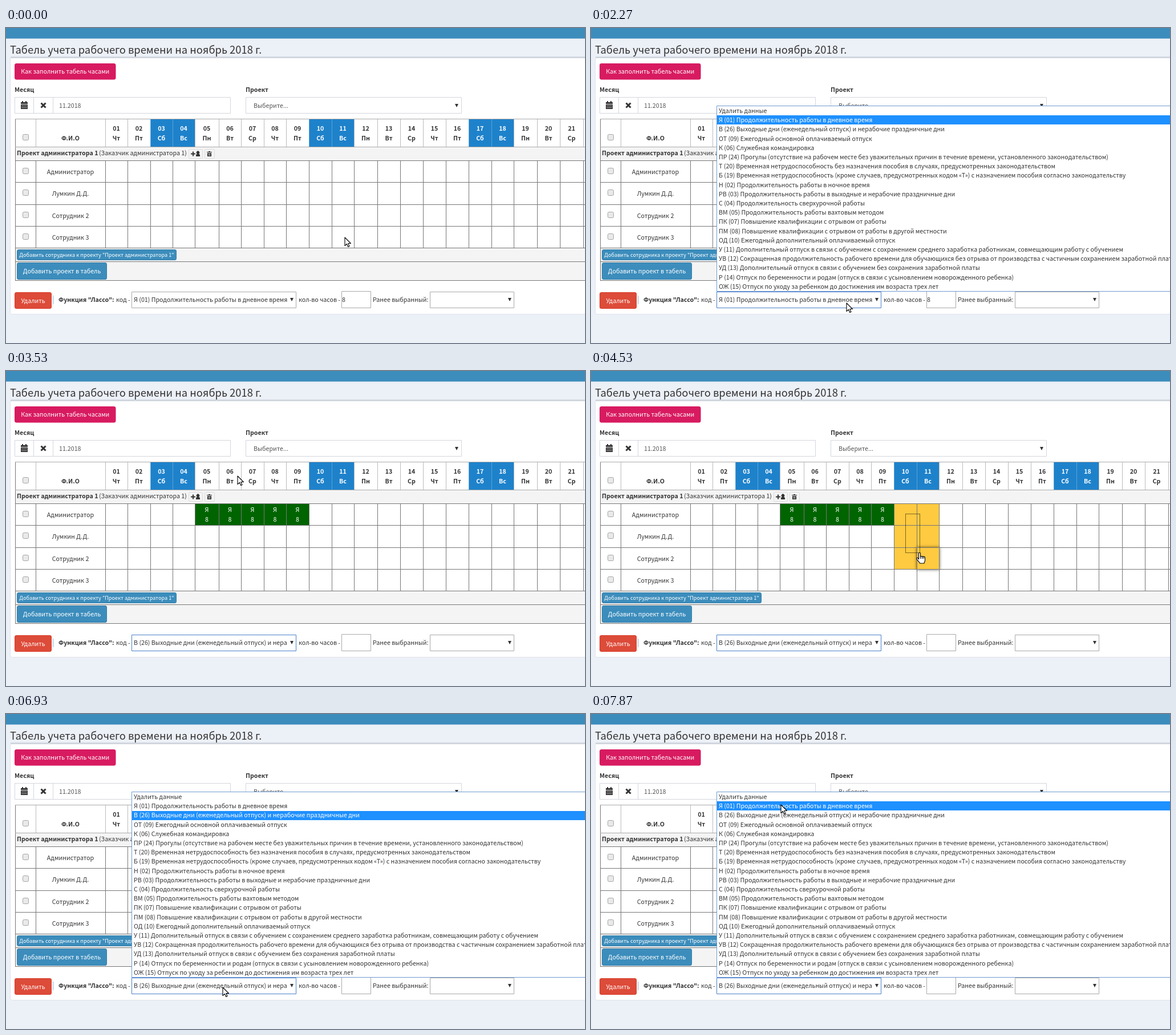
An HTML page with a canvas for the animation above (8 s loop, 1015x552 px).

```html
<!DOCTYPE html>
<html lang="ru">
<head>
<meta charset="utf-8">
<style>
html, body { margin: 0; width: 100%; height: 100%; overflow: hidden; background: #ecf0f7; }
canvas { display: block; }
</style>
</head>
<body>
<canvas id="stage" width="1015" height="552"></canvas>
<script>
const ctx = document.getElementById('stage').getContext('2d');
const LOOP = 8000;
const INK = '#333', GRID = '#777', BLUE = '#3c8dbc', FIELD = '#d2d6de';

// Prefer the CJK face only if its Cyrillic is proportional.
const CJK = '"Noto Sans CJK JP", "Noto Sans CJK SC", "Noto Sans", sans-serif';
ctx.font = '10px ' + CJK;
const FAMILY = ctx.measureText('жизнь').width < 38 ? CJK : '"Noto Sans", "Open Sans", sans-serif';
const font = (size, weight = 400) => `${weight} ${size}px ${FAMILY}`;
const REGULAR = font(10.68), BOLD = font(10.68, 700), SMALL = font(9.2), TITLE = font(18.36);

const columns = [174, 213, 253, 292, 331, 373, 412, 452, 491, 531, 571, 610,
  651, 691, 731, 771, 811, 851, 890, 931, 971, 1012, 1052];
const rows = [232, 270, 309, 347, 385];
const weekdays = ['Чт', 'Пт', 'Сб', 'Вс', 'Пн', 'Вт', 'Ср'];
const people = ['Администратор', 'Лумкин Д.Д.', 'Сотрудник 2', 'Сотрудник 3'];
const codes = [
  'Удалить данные',
  'Я (01) Продолжительность работы в дневное время',
  'В (26) Выходные дни (еженедельный отпуск) и нерабочие праздничные дни',
  'ОТ (09) Ежегодный основной оплачиваемый отпуск',
  'К (06) Служебная командировка',
  'ПР (24) Прогулы (отсутствие на рабочем месте без уважительных причин в течение времени, установленного законодательством)',
  'Т (20) Временная нетрудоспособность без назначения пособия в случаях, предусмотренных законодательством',
  'Б (19) Временная нетрудоспособность (кроме случаев, предусмотренных кодом «Т») с назначением пособия согласно законодательству',
  'Н (02) Продолжительность работы в ночное время',
  'РВ (03) Продолжительность работы в выходные и нерабочие праздничные дни',
  'С (04) Продолжительность сверхурочной работы',
  'ВМ (05) Продолжительность работы вахтовым методом',
  'ПК (07) Повышение квалификации с отрывом от работы',
  'ПМ (08) Повышение квалификации с отрывом от работы в другой местности',
  'ОД (10) Ежегодный дополнительный оплачиваемый отпуск',
  'У (11) Дополнительный отпуск в связи с обучением с сохранением среднего заработка работникам, совмещающим работу с обучением',
  'УВ (12) Сокращенная продолжительность рабочего времени для обучающихся без отрыва от производства с частичным сохранением заработной платы',
  'УД (13) Дополнительный отпуск в связи с обучением без сохранения заработной платы',
  'Р (14) Отпуск по беременности и родам (отпуск в связи с усыновлением новорожденного ребенка)',
  'ОЖ (15) Отпуск по уходу за ребенком до достижения им возраста трех лет'
];
const MENU_TOP = 137.2, MENU_ROW = 16.2;

// Pointer stops: time, x, y
const route = [
  [70, 594, 367], [530, 365, 254], [670, 365, 254], [1070, 503, 254], [1200, 507, 254],
  [1470, 507, 254], [2000, 448, 482], [2530, 448, 482], [3200, 406, 184], [3530, 406, 184],
  [3730, 548, 224], [3870, 548, 226], [4000, 551, 250], [4200, 551, 250], [4800, 595, 368],
  [6330, 595, 368], [6730, 380, 479], [7130, 380, 479], [7530, 337, 147], [7670, 337, 147],
  [7870, 333, 159]
];
const lassos = [
  { start: 670, release: 1270, filled: 1470, x: 365, y: 254, marks: ['Я', '8'], fill: '#006400', ink: '#fff' },
  { start: 4200, release: 5270, filled: 5600, x: 551, y: 250, marks: ['В'], fill: '#ff0', ink: '#2b7d2b' }
];

const ARROW = new Path2D('M0 0V14.6L3.4 11.4 5.7 16.4 8 15.4 5.8 10.5H10.4Z');
const HAND = new Path2D('M-1.5 12V1.8a1.5 1.5 0 0 1 3 0V8c0-2 3-1.7 3 0c0-1.6 2.6-1.4 2.6.3' +
  'c0-1.5 2.4-1.2 2.4.6V14c0 2-1.5 3-1.5 5H.5C-.5 16.5-4 13.5-5 11.2c-.8-2 1.5-2.4 2.3-1.2Z');
const KNUCKLES = new Path2D('M1.5 8v3M4.5 8v3M7.1 8.5v2.5');

function rect(x, y, w, h, color) {
  ctx.fillStyle = color;
  ctx.fillRect(x, y, w, h);
}
function box(x, y, w, h, fill, border, radius = 0) {
  ctx.beginPath();
  ctx.roundRect(x + .5, y + .5, w - 1, h - 1, radius);
  ctx.fillStyle = fill;
  ctx.fill();
  ctx.strokeStyle = border;
  ctx.lineWidth = 1;
  ctx.stroke();
}
function text(s, x, y, { color = INK, align = 'left', face = REGULAR } = {}) {
  ctx.font = face;
  ctx.fillStyle = color;
  ctx.textAlign = align;
  ctx.fillText(s, x, Math.round(y));
}
function shape(d, color) {
  ctx.fillStyle = color;
  ctx.fill(new Path2D(d));
}
function button(label, x, y, w, h, fill, border, face = REGULAR) {
  box(x, y, w, h, fill, border, 2.5);
  text(label, x + w / 2, y + h / 2 + (face === SMALL ? 3.5 : 4), { color: '#fff', align: 'center', face });
}
const checkbox = y => box(29, y, 11, 11, '#e9e9e9', '#a5a5a5', 2);
const caret = (x, y) => shape(`M${x} ${y}h6l-3 6z`, INK);

function pointer(t) {
  const i = route.findIndex(stop => stop[0] > t);
  if (i === 0) return route[0].slice(1);
  if (i < 0) return route.at(-1).slice(1);
  const [t0, x0, y0] = route[i - 1], [t1, x1, y1] = route[i];
  const k = (t - t0) / (t1 - t0), e = k * k * (3 - 2 * k);
  return [x0 + (x1 - x0) * e, y0 + (y1 - y0) * e];
}

function drawPage() {
  rect(0, 0, 1015, 552, '#ecf0f7');
  rect(0, 0, 1015, 18.5, BLUE);
  text('Табель учета рабочего времени на ноябрь 2018 г.', 7, 45, { face: TITLE });
  box(7, 50, 1020, 452, '#fff', '#dfe2ea', 3);
  rect(8, 50, 1007, 3, FIELD);
  button('Как заполнить табель часами', 15, 62, 177.5, 28.5, '#d81b60', '#d81b60');

  text('Месяц', 15, 112, { face: BOLD });
  text('Проект', 420, 112, { face: BOLD });
  box(15, 121, 379, 29, '#fff', FIELD);
  rect(48, 121, 1, 29, FIELD);
  rect(82, 121, 1, 29, FIELD);
  text('11.2018', 93, 140, { color: '#555' });
  shape('M26 130h2v-2h2v2h4v-2h2v2h2v3h-12zM26 134h12v8h-12z', INK);
  for (const y of [136, 139]) rect(27, y, 10, 1, '#aaa');
  ctx.strokeStyle = INK;
  ctx.lineWidth = 3;
  ctx.stroke(new Path2D('M61.5 131.5l8 8m0-8l-8 8'));
  box(420, 121, 379, 29, '#fff', FIELD);
  text('Выберите...', 434, 140, { color: '#555' });
  caret(787, 133);
}

function drawTable() {
  rect(16, 208, 999, 24, '#f4f4f4');
  rect(16, 385, 999, 57, '#f4f4f4');
  columns.forEach((x, i) => {
    const weekend = i % 7 === 2 || i % 7 === 3;
    const style = { align: 'center', face: BOLD, color: weekend ? '#fff' : INK };
    const mid = (x + columns[i + 1]) / 2;
    if (weekend) rect(x, 160, columns[i + 1] - x, 48, '#1e82cb');
    rect(x, 160, 1, 48, weekend ? '#5aa3d8' : '#bbb');
    rect(x, 232, 1, 154, GRID);
    text(String(i + 1).padStart(2, '0'), mid, 180, style);
    text(weekdays[i % 7], mid, 197, style);
  });
  rect(52, 160, 1, 48, '#bbb');
  rect(52, 232, 1, 154, GRID);
  rect(16, 159, 1, 284, GRID);
  for (const y of [159, 208]) rect(16, y, 999, 1, '#aaa');
  for (const y of [...rows, 409, 442]) rect(16, y, 999, 1, GRID);

  checkbox(186);
  text('Ф.И.О', 113, 197, { align: 'center', face: BOLD });
  people.forEach((name, i) => {
    checkbox(rows[i] + 13);
    text(name, 113, rows[i] + 24, { align: 'center' });
  });

  text('Проект администратора 1', 19, 223, { face: BOLD });
  text('(Заказчик администратора 1)', 163, 223);
  box(320, 212, 25, 17, '#f4f4f4', '#ddd', 2);
  box(348, 212, 18, 17, '#f4f4f4', '#ddd', 2);
  shape('M324 219.5h3v-3h2v3h3v2h-3v3h-2v-3h-3zM333 225v-2q0-2 2-2.5a2.7 2.7 0 1 1 3 0q2 .5 2 2.5v2z', INK);
  shape('M352 217h3v-1h3v1h3v1h-9zM353 219h7v6h-7z', INK);
  rect(355, 220, 1, 4, '#ccc');
  rect(357, 220, 1, 4, '#ccc');

  button('Добавить сотрудника к проекту "Проект администратора 1"', 19, 388, 280, 19, BLUE, '#367fa9', SMALL);
  button('Добавить проект в табель', 19, 411, 158, 30, BLUE, '#367fa9');
}

function drawTools(t, value) {
  button('Удалить', 15, 463, 65, 29, '#dd4b39', '#d73925');
  rect(82, 469, 1, 15, '#8ab4cf');
  text('Функция "Лассо":', 92, 480, { face: BOLD });
  text('код -', 193, 480);
  box(220, 462, 289, 29, '#fff', t >= 2000 ? '#4a7fc9' : '#a9a9a9');
  ctx.save();
  ctx.beginPath();
  ctx.rect(222, 463, 271, 27);
  ctx.clip();
  text(codes[value], 224, 480);
  ctx.restore();
  caret(498, 473);
  text('кол-во часов -', 513, 480);
  box(588, 461, 52, 30, '#fff', '#a9a9a9');
  if (value === 1) text('8', 589, 480);
  text('Ранее выбранный:', 643, 480);
  box(743, 462, 148, 29, '#fff', '#a9a9a9');
  caret(880, 473);
}

function drawCells(t, hover) {
  const painted = new Map();
  const cell = (r, c, style) => {
    const x = columns[c], y = rows[r], w = columns[c + 1] - x, h = rows[r + 1] - y;
    box(x, y, w + 1, h + 1, style?.fill ?? '#fff', GRID);
    style?.marks?.forEach((mark, i) =>
      text(mark, x + w / 2, y + 15 + 17 * i, { color: style.ink, align: 'center' }));
  };
  for (const lasso of lassos) {
    if (t < lasso.start) continue;
    const [x, y] = pointer(Math.min(t, lasso.release));
    const style = t >= lasso.filled ? lasso : { fill: t >= lasso.release ? '#f39814' : '#feca40' };
    for (let r = 0; r < 4; r++) {
      for (let c = 0; c < 22; c++) {
        if (columns[c] > x || columns[c + 1] < lasso.x || rows[r] > y || rows[r + 1] < lasso.y) continue;
        painted.set(r * 22 + c, style);
        cell(r, c, style);
      }
    }
  }
  if (!hover) return;
  const c = columns.findLastIndex(x => x <= hover[0]);
  const r = rows.findLastIndex(y => y <= hover[1]);
  ctx.save();
  ctx.shadowColor = 'rgba(0,0,0,.65)';
  ctx.shadowBlur = 5;
  rect(columns[c], rows[r], columns[c + 1] - columns[c] + 1, rows[r + 1] - rows[r] + 1, '#fff');
  ctx.restore();
  cell(r, c, painted.get(r * 22 + c));
}

function drawLasso(t, [x, y]) {
  const lasso = lassos.find(l => t >= l.start && t < l.release);
  if (!lasso) return;
  ctx.strokeStyle = '#000';
  ctx.lineWidth = 1;
  ctx.setLineDash([1, 1]);
  ctx.strokeRect(lasso.x + .5, lasso.y + .5, Math.round(x - lasso.x), Math.round(y - lasso.y));
  ctx.setLineDash([]);
}

function drawMenu(value, y) {
  const active = y < MENU_TOP + MENU_ROW * codes.length ? Math.floor((y - MENU_TOP) / MENU_ROW) : value;
  box(220, 136, 810, 326, '#fff', '#6f9bd1');
  rect(221, Math.round(MENU_TOP + active * MENU_ROW), 794, 16, '#1e90ff');
  codes.forEach((code, i) =>
    text(code, 224, 149 + i * MENU_ROW, { color: i === active ? '#fff' : INK }));
}

function drawPointer([x, y], hand) {
  ctx.save();
  ctx.translate(Math.round(x), Math.round(y));
  ctx.lineJoin = 'round';
  ctx.lineWidth = 1.1;
  ctx.strokeStyle = '#000';
  ctx.fillStyle = '#fff';
  ctx.fill(hand ? HAND : ARROW);
  ctx.stroke(hand ? HAND : ARROW);
  if (hand) ctx.stroke(KNUCKLES);
  ctx.restore();
}

function draw() {
  const t = performance.now() % LOOP;
  const at = pointer(t);
  const value = t < 3530 ? 1 : 2;
  const open = (t >= 2200 && t < 3530) || t >= 6870;
  const overCells = t >= 70 && !open && at[0] > columns[0] && at[1] >= rows[0] && at[1] < rows[4];
  drawPage();
  drawTable();
  drawTools(t, value);
  drawCells(t, overCells && at);
  drawLasso(t, at);
  if (open) drawMenu(value, at[1]);
  drawPointer(at, overCells);
  requestAnimationFrame(draw);
}
draw();
</script>
</body>
</html>
```
